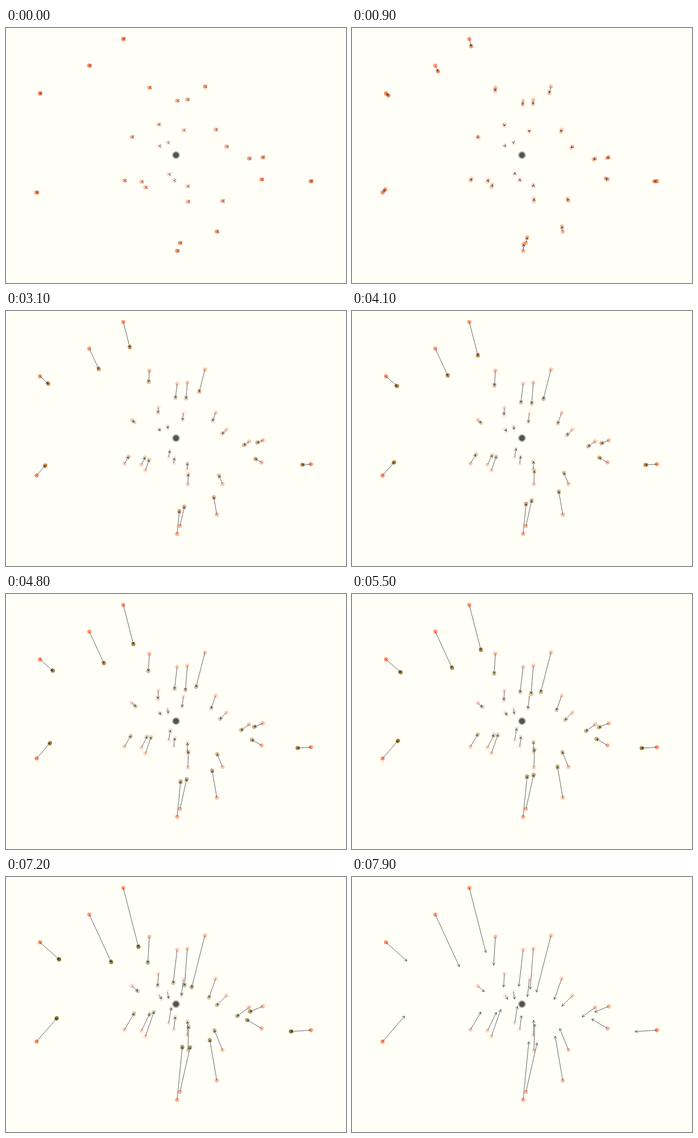
Recreate the animation shown at these times as an HTML page with a canvas. Size 600 by 450 pixels, loop 10000 ms.

```html
<!DOCTYPE html>
<html lang="en">
<head>
<meta charset="utf-8">
<title>Points drifting to a centre</title>
<style>
  html, body { margin: 0; width: 100%; height: 100%; overflow: hidden; background: #fffff8; }
  canvas { display: block; }
</style>
</head>
<body>
<canvas id="stage" width="600" height="450"></canvas>
<script>
const ctx = document.getElementById('stage').getContext('2d');
const LOOP = 10000, STEP = 100, LAST = 79;
const CENTER = { x: 300, y: 224 };
const START_RGB = [255, 127, 80], END_RGB = [90, 98, 0];

// start x, start y, arrow tip x, arrow tip y
const arrows = [
  [207, 19, 236.3, 133], [147, 66, 189.5, 158], [60, 115, 97, 148],
  [253, 105, 250, 155.5], [351, 103, 325.5, 203], [302, 128, 294.5, 192.5],
  [320, 126, 314.5, 197.5], [269, 170, 267.5, 194], [313, 180, 309.5, 211],
  [370, 179, 357, 216], [222, 192, 233.5, 202], [270, 208, 275, 215.5],
  [285, 202, 287, 215], [389, 209, 370.5, 227.5], [429, 230, 406, 246.5],
  [453, 228, 428.5, 238], [451, 267, 423, 250.5], [538, 270, 499.5, 272.5],
  [209, 269, 227.5, 238], [239, 271, 255, 238.5], [246, 281, 262.5, 233.5],
  [287, 258, 292, 228], [296, 269, 299, 244.5], [320, 279, 320.5, 252.5],
  [321, 306, 322.5, 259.5], [382, 305, 366.5, 267], [372, 359, 358.5, 280.5],
  [307, 379, 326.5, 292.5], [302, 393, 312, 290.5], [54, 290, 93, 245]
].map(([x, y, tx, ty]) => ({
  x, y, dx: tx - x, dy: ty - y,
  alpha: Math.min(0.9, Math.hypot(x - CENTER.x, y - CENTER.y) / 300)
}));

const mix = p => `rgb(${START_RGB.map((c, i) => Math.round(c + (END_RGB[i] - c) * p))})`;

// Fill and outline overlap, so translucent discs get a darker rim.
function disc(x, y, r, color, alpha) {
  ctx.globalAlpha = alpha;
  ctx.fillStyle = ctx.strokeStyle = color;
  ctx.lineWidth = 0.75;
  ctx.beginPath();
  ctx.arc(x, y, r, 0, Math.PI * 2);
  ctx.fill();
  ctx.stroke();
}

function arrow(a, p) {
  const x = a.x + a.dx * p, y = a.y + a.dy * p;
  const back = p ? Math.atan2(-a.dy, -a.dx) : 0;
  const leg = turn => [x + 5 * Math.cos(back + turn), y + 5 * Math.sin(back + turn)];
  ctx.globalAlpha = 0.8;
  ctx.strokeStyle = '#000';
  ctx.lineWidth = 0.75;
  ctx.beginPath();
  ctx.moveTo(a.x, a.y);
  ctx.lineTo(x, y);
  ctx.moveTo(...leg(Math.PI / 6));
  ctx.lineTo(x, y);
  ctx.lineTo(...leg(-Math.PI / 6));
  ctx.stroke();
}

function draw(step) {
  const p = step / LAST;
  ctx.setTransform(1, 0, 0, 1, 0, 0);
  ctx.globalAlpha = 1;
  ctx.fillStyle = '#fffff8';
  ctx.fillRect(0, 0, 600, 450);
  ctx.translate(0, 0.3);

  for (const a of arrows) disc(a.x, a.y, 3.3, mix(0), a.alpha);
  if (step < LAST) {
    for (const a of arrows) disc(a.x + a.dx * p, a.y + a.dy * p, 3.3, mix(p), a.alpha);
  }
  for (const a of arrows) arrow(a, p);

  disc(CENTER.x, CENTER.y, 6.4, '#000', 0.28);
  disc(CENTER.x, CENTER.y, 4.4, '#000', 0.55);
}

let shown = -1;
function tick() {
  const step = Math.min(LAST, Math.floor(performance.now() % LOOP / STEP));
  if (step !== shown) draw(shown = step);
  requestAnimationFrame(tick);
}
tick();
</script>
</body>
</html>
```
